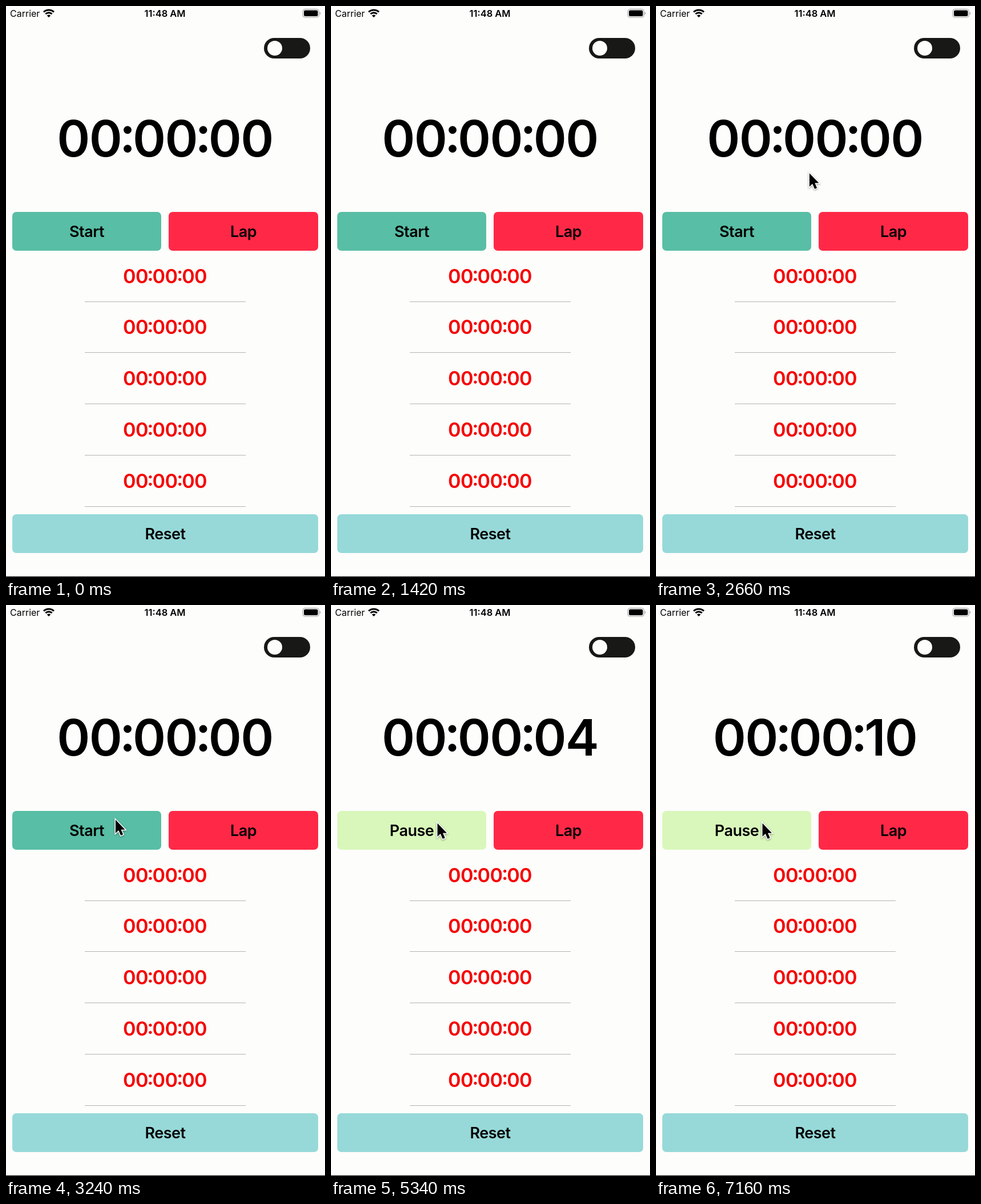
These frames come from a looping animation (559x1001 px, 7180 ms). An HTML page:

```html
<!DOCTYPE html>
<html lang="en">
<head>
<meta charset="utf-8">
<title>Stopwatch</title>
<style>
  html, body { margin: 0; width: 100%; height: 100%; overflow: hidden; background: #fdfdfb; }
  svg { display: block; width: 559px; height: 1001px; }
  text { font: 600 27px Inter, sans-serif; text-anchor: middle; letter-spacing: -.018em; }
  #clock { font-size: 88px; }
  .lap { font-size: 34.2px; fill: #f40404; }
  .status { font-size: 16.5px; letter-spacing: 0; }
  #cursor { filter: drop-shadow(0 1.5px 1.5px #0006); }
</style>
</head>
<body>
<svg viewBox="0 0 559 1001">
  <rect width="559" height="1001" fill="#fdfdfb"/>
  <rect y="1000" width="559" height="1"/>

  <text class="status" x="7" y="19" style="font-weight:400;font-size:16px;text-anchor:start">Carrier</text>
  <g fill="none" stroke="#000" stroke-width="3">
    <path d="M66 10.5A13 13 0 0 1 84 10.5M69.3 14A8.3 8.3 0 0 1 80.7 14"/>
    <path d="M75 20L71.8 16.8A4.6 4.6 0 0 1 78.2 16.8Z" fill="#000" stroke="none"/>
  </g>
  <text class="status" x="278.5" y="19">11:48 AM</text>
  <rect x="520" y="5.5" width="28.5" height="14.5" rx="4" fill="none" stroke="#999"/>
  <rect x="522" y="7.5" width="24.5" height="10.5" rx="2.5"/>
  <path d="M550 10.5Q552.5 12.8 550 15Z" fill="#888"/>

  <rect x="452" y="56" width="81" height="36" rx="18" fill="#181817"/>
  <circle cx="471" cy="74" r="13" fill="#fdfdfb"/>

  <text id="clock" x="278.5" y="264"></text>

  <rect id="toggle" x="11" y="361" width="261" height="68" rx="7"/>
  <text id="label" x="141.5" y="404.5">Start</text>
  <rect x="285" y="361" width="262" height="68" rx="7" fill="#ff2947"/>
  <text x="416" y="404.5">Lap</text>
  <g id="laps"></g>
  <rect x="11" y="891" width="536" height="68" rx="7" fill="#97d9d9"/>
  <text x="279" y="935">Reset</text>

  <path id="cursor" d="M0 0V23.5L5.3 18.6L9.2 27.5L13.2 25.8L9.5 17.2H16.5Z"
        stroke="#fff" stroke-width="3" paint-order="stroke"/>
</svg>
<script>
  const LOOP = 7180, STARTED = 3950, TICK = 300;
  // Pointer path: time, x, y
  const path = [
    [2300, 300, 1001], [2660, 269, 293], [3240, 192, 376.5], [3500, 186.5, 382.5], [LOOP, 186.5, 382.5]
  ];
  const $ = id => document.getElementById(id);

  // Colons sit tight and centred on the digit height
  const timeMarkup = seconds => ['00', '00', String(seconds).padStart(2, '0')]
    .map(part => `<tspan>${part}</tspan>`)
    .join('<tspan dx="-.038em" dy="-.09em">:</tspan><tspan dx="-.038em" dy=".09em">\u200b</tspan>');

  for (let i = 0; i < 5; i++) {
    const y = 485.5 + i * 89.75;
    $('laps').innerHTML += `<text class="lap" x="278.5" y="${y}">${timeMarkup(0)}</text>
      <rect x="138" y="${Math.round(y + 32)}" width="282" height="1" fill="#b4b4b4"/>`;
  }

  function movePointer(t) {
    const visible = t >= path[0][0];
    $('cursor').style.display = visible ? '' : 'none';
    if (!visible) return;
    const next = path.findIndex(p => p[0] > t);
    const [t0, x0, y0] = path[next - 1], [t1, x1, y1] = path[next];
    let k = (t - t0) / (t1 - t0);
    if (next === 1) k = 1 - (1 - k) ** 2;
    $('cursor').setAttribute('transform', `translate(${x0 + (x1 - x0) * k} ${y0 + (y1 - y0) * k})`);
  }

  function draw() {
    const t = performance.now() % LOOP;
    const running = t >= STARTED;
    $('clock').innerHTML = timeMarkup(running ? Math.floor((t - STARTED) / TICK) : 0);
    $('label').textContent = running ? 'Pause' : 'Start';
    $('toggle').setAttribute('fill', running ? '#d9f7bb' : '#58bea5');
    movePointer(t);
    requestAnimationFrame(draw);
  }
  draw();
</script>
</body>
</html>
```
